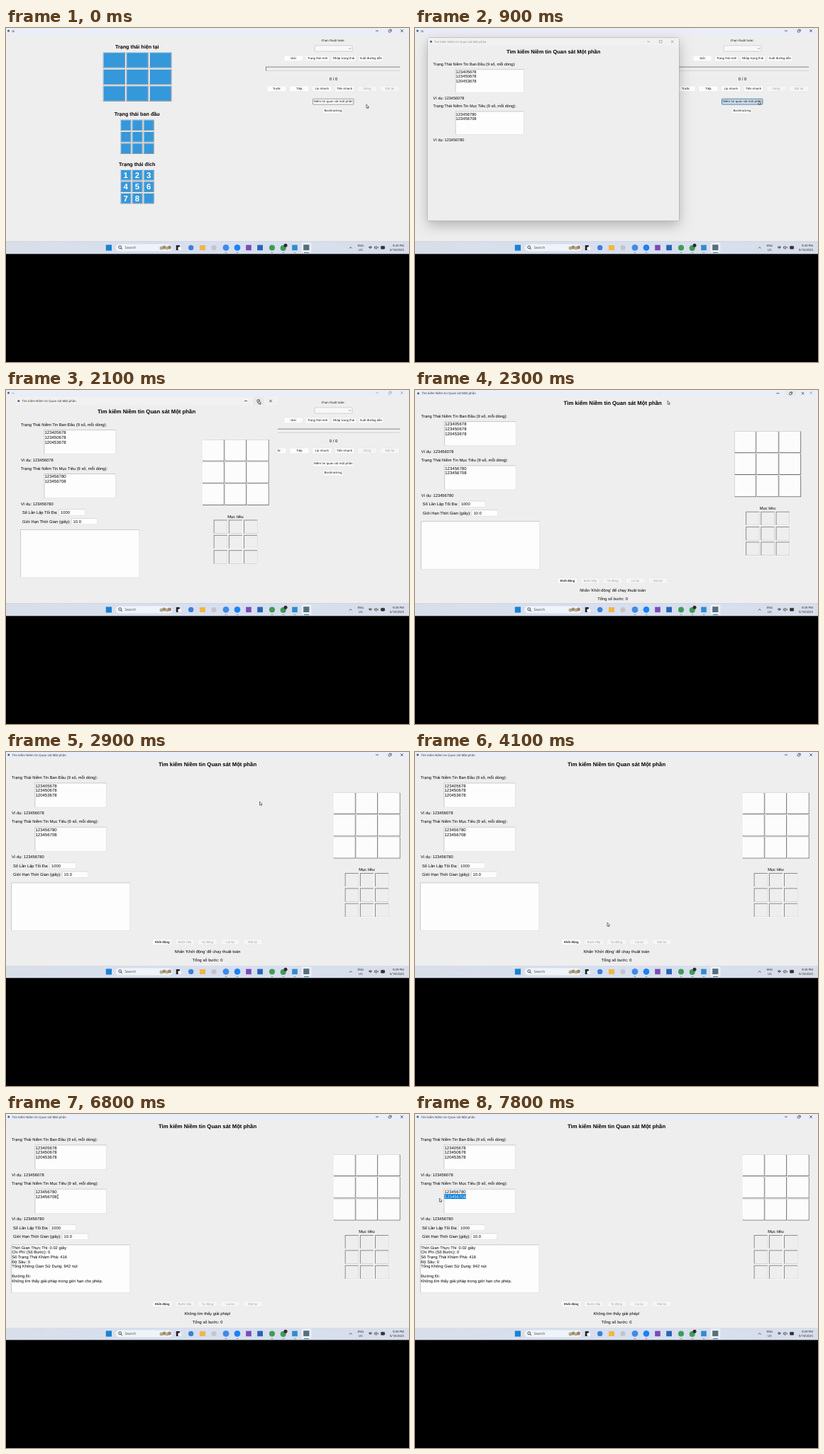
An HTML page with a canvas for the animation above (8 s loop, 568 by 472 pixels).

```html
<!DOCTYPE html>
<html lang="vi">
<head>
<meta charset="utf-8">
<title>Tìm kiếm Niềm tin</title>
<style>
html, body { margin: 0; width: 100%; height: 100%; overflow: hidden; background: #000; }
canvas { display: block; width: 568px; height: 472px; }
</style>
</head>
<body>
<canvas id="stage" width="568" height="472"></canvas>
<script>
const ctx = document.getElementById('stage').getContext('2d');
const LOOP = 8000, OPEN = 780, READY = 1000, MAXIMIZE = 2150, RESULT = 5250;
const UI = '"Open Sans", "Noto Sans", sans-serif';
const ARIAL = '"Liberation Sans", Arial, sans-serif';
const GREY = '#eeeeee', BLUE = '#3498db';
const TITLE = 'Tìm kiếm Niềm tin Quan sát Một phần';

// time, x, y of the pointer tip
const PATH = [
  [0, 508, 108], [500, 484, 103], [1100, 484, 103], [1900, 356, 14.5], [2300, 356, 15],
  [2850, 357.5, 70], [3100, 357.5, 70], [3800, 333, 197], [4100, 271, 241], [4650, 221.5, 270],
  [6100, 221.5, 270], [6450, 100, 104], [6600, 73, 114], [6800, 73, 114],
  [7600, 37, 116], [7800, 34.5, 119], [8000, 34.5, 119]
];

const clamp = v => Math.max(0, Math.min(1, v));
const lerp = (a, b, k) => a + (b - a) * k;

let pointer = { x: 0, y: 0 };

function pointerAt(t) {
  const i = Math.max(1, PATH.findIndex(p => p[0] > t));
  const [t0, x0, y0] = PATH[i - 1], [t1, x1, y1] = PATH[i];
  const k = (t - t0) / (t1 - t0);
  return { x: lerp(x0, x1, k), y: lerp(y0, y1, k) };
}

function rect(x, y, w, h, fill) {
  ctx.fillStyle = fill;
  ctx.fillRect(x, y, w, h);
}

function round(x, y, w, h, r, fill, stroke, width = 0.6) {
  ctx.beginPath();
  ctx.roundRect(x, y, w, h, r);
  if (fill) { ctx.fillStyle = fill; ctx.fill(); }
  if (stroke) { ctx.strokeStyle = stroke; ctx.lineWidth = width; ctx.stroke(); }
}

function dot(x, y, r, fill) {
  ctx.beginPath();
  ctx.arc(x, y, r, 0, 7);
  ctx.fillStyle = fill;
  ctx.fill();
}

function line(points, color = '#333', width = 0.7) {
  ctx.beginPath();
  points.forEach(([x, y]) => ctx.lineTo(x, y));
  ctx.strokeStyle = color;
  ctx.lineWidth = width;
  ctx.stroke();
}

// Set large and scaled down so that glyph advances stay fractional.
function text(s, x, y, size, { align = 'left', color = '#000', font = ARIAL, weight = 400 } = {}) {
  ctx.save();
  ctx.translate(x, y + size * 0.35);
  ctx.scale(0.1, 0.1);
  ctx.textRendering = 'geometricPrecision';
  ctx.font = `${weight} ${size * 10}px ${font}`;
  ctx.textAlign = align;
  ctx.fillStyle = color;
  ctx.fillText(s, 0, 0);
  ctx.restore();
}

const label = (s, x, y) => text(s, x, y, 5.78);
const centered = (s, x, y, size, extra) => text(s, x, y, size, { align: 'center', ...extra });

function bevel(x, y, w, h, fill, light, dark, edge = 1) {
  rect(x, y, w, h, dark);
  rect(x, y, w - edge, h - edge, light);
  rect(x + edge, y + edge, w - 2 * edge, h - 2 * edge, fill);
}

function grid(x, y, dx, dy, draw) {
  for (let i = 0; i < 9; i++) draw(x + i % 3 * dx, y + Math.floor(i / 3) * dy, i);
}

function button(s, cx, cy, w, { off = false, focus = false, weight = 400, ox = 0, oy = 0, active = true } = {}) {
  const x = cx - w / 2, y = cy - 3.8, px = pointer.x - ox, py = pointer.y - oy;
  const hover = active && !off && px > x && px < x + w && py > y && py < y + 7.8;
  round(x, y, w, 7.8, 0.6, hover ? '#d3e0ec' : off ? '#f5f5f5' : '#fcfcfc',
    hover ? '#3a76ab' : focus ? '#666' : '#e6e6e6', hover ? 0.9 : 0.6);
  centered(s, cx, cy, 4.2, { font: UI, color: off ? '#999' : '#000', weight });
}

function titleBar(s, w, y, color, textX, fill, height) {
  rect(0, 0, w, height, fill);
  dot(textX - 4.8, y, 1.5, '#3b5f8c');
  text(s, textX, y, 4.3, { font: UI, color });
}

function windowIcons(w, y, color, restored) {
  line([[w - 47, y], [w - 43, y]], color);
  if (restored) round(w - 29, y - 1.8, 3.6, 3.6, 0.3, null, color);
  else {
    round(w - 28.8, y - 1, 3, 3, 0.5, null, color);
    line([[w - 27.8, y - 1.9], [w - 24.8, y - 1.9], [w - 24.8, y + 1]], color, 0.6);
  }
  line([[w - 11.8, y - 1.8], [w - 8.2, y + 1.8]], color);
  line([[w - 11.8, y + 1.8], [w - 8.2, y - 1.8]], color);
}

function mainWindow(t) {
  const color = t < READY ? '#222' : '#999';
  rect(0, 0, 568, 302, GREY);
  titleBar('tk', 568, 4, color, 8.3, '#e9eef8', 8.5);
  windowIcons(568, 4, color, false);

  const heading = (s, y) => centered(s, 184.7, y, 7.2, { weight: 700 });
  const tile = (w, h) => (x, y) => bevel(x, y, w, h, BLUE, '#d4dde3', '#858b90', 0.9);
  heading('Trạng thái hiện tại', 26.5);
  grid(136.7, 34.3, 32.7, 23.6, tile(31.3, 22.2));
  heading('Trạng thái ban đầu', 121.7);
  grid(161.3, 129.5, 16.2, 16.5, tile(15, 15.4));
  heading('Trạng thái đích', 192.3);
  grid(161.3, 200, 16.2, 16.5, (x, y, i) => {
    tile(15, 15.4)(x, y);
    if (i < 8) centered(String(i + 1), x + 7.5, y + 7.7, 11.5, { weight: 700, color: '#fff' });
  });

  centered('Chọn thuật toán:', 461, 17.5, 4.2, { font: UI });
  round(435, 24.8, 53, 8.2, 0.6, '#f8f8f8', '#bbb');
  line([[483, 28.3], [484.5, 29.8], [486, 28.3]], '#555', 0.6);
  const active = t < 1150;
  button('Giải', 405, 42.8, 26, { active });
  button('Trạng thái mới', 439, 42.8, 33, { active });
  button('Nhập trạng thái', 476, 42.8, 35, { active });
  button('Xuất đường dẫn', 514.5, 42.8, 35, { active });
  bevel(366, 54.6, 190, 6.8, GREY, '#757575', '#f8f8f8', 0.9);
  centered('0 / 0', 461.5, 71.5, 5.9);
  ['Trước', 'Tiếp', 'Lùi nhanh', 'Tiến nhanh', 'Dừng', 'Đặt lại'].forEach((s, i) =>
    button(s, 381.5 + i * 31.9, 85.8, 27, { off: i > 3, active }));
  button('Niềm tin quan sát một phần', 461.2, 104, 57.4, { focus: t < OPEN, active });
  button('Backtracking', 461, 117, 28, { active });
}

function textBox(x, y, w, h, lines, step = 6.65, size = 6.05) {
  bevel(x, y, w, h, '#fdfdfd', '#bcbcbc', '#e6e6e6', 0.7);
  lines.forEach((s, i) => text(s, x + 0.8, y + 4 + i * step, size));
}

function entry(s, x, y) {
  bevel(x, y - 4.5, 37, 9, '#fdfdfd', '#cecece', '#e6e6e6', 0.6);
  label(s, x + 2.6, y);
}

function selection(t) {
  if (t < 6850) return;
  const charWidth = 3.364, left = 41.5;
  const from = Math.max(0, Math.round((pointer.x - left) / charWidth));
  if (from > 8) return;
  const x = left + from * charWidth;
  rect(x, 113.2, 72 - x, 6.8, '#0078d7');
  text('123456708'.slice(from), x + 0.3, 116.6, 6.05, { color: '#fff' });
}

function dialogContent(t, w, rest, ox, oy) {
  const right = w - 568, mid = w / 2;
  centered(TITLE, mid, 17.3, 7.75, { weight: 700 });
  label('Trạng Thái Niềm Tin Ban Đầu (9 số, mỗi dòng):', 8, 36.2);
  textBox(40.6, 43.6, 101.6, 35, ['123405678', '123450678', '120453678']);
  label('Ví dụ: 123456078', 8, 86.3);
  label('Trạng Thái Niềm Tin Mục Tiêu (9 số, mỗi dòng):', 8, 98.3);
  textBox(40.6, 105.8, 101.6, 35, ['123456780', '123456708']);
  selection(t);
  label('Ví dụ: 123456780', 8, 148.4);
  if (t < READY) return;

  label('Số Lần Lặp Tối Đa:', 10, 160.5);
  entry('1000', 61.5, 160.5);
  label('Giới Hạn Thời Gian (giây):', 10, 173.2);
  entry('10.0', 79, 173.2);
  const done = t >= RESULT;
  textBox(7.4, 184.6, 168, 68.4, done ? [
    'Thời Gian Thực Thi: 0.02 giây', 'Chi Phí (Số Bước): 0', 'Số Trạng Thái Khám Phá: 416',
    'Độ Sâu: 0', 'Tổng Không Gian Sử Dụng: 942 nút', '', 'Đường Đi:',
    'Không tìm thấy giải pháp trong giới hạn cho phép.'] : [], 6.7, 5.78);

  grid(462 + right, 57.8, 31.5, 31.2, (x, y) => bevel(x, y, 30.6, 30.2, '#fcfcfc', '#fff', '#6c6c6c', 1));
  centered('Mục tiêu:', 509 + right, 166.3, 5.78);
  grid(477.7 + right, 171, 21.2, 21.4, (x, y) => bevel(x, y, 20, 20, GREY, '#808080', '#f8f8f8', 0.9));

  // The restored window is too short for the footer and cuts it off.
  const footer = 268.4 + 4.5 * rest;
  ['Khởi động', 'Bước tiếp', 'Tự động', 'Lùi lại', 'Đặt lại'].forEach((s, i) =>
    button(s, mid - 63.8 + i * 31.9, footer, 27, { off: i > 0, weight: i ? 400 : 600, ox, oy }));
  centered(done ? 'Không tìm thấy giải pháp!' : "Nhấn 'Khởi động' để chạy thuật toán", mid, footer + 13.1, 5.75);
  centered('Tổng số bước: 0', mid, footer + 25.6, 5.78);
}

function dialog(t) {
  const grow = 1 - (1 - clamp((t - MAXIMIZE) / 250)) ** 3;
  const rest = 1 - grow;
  const opening = 1 - clamp((t - 800) / 200);
  const scale = 1 - 0.086 * opening;
  const x = 13 * rest + 10 * opening, y = 10 * rest + 8 * opening;
  const w = 370 + 198 * grow, h = 270 + 32 * grow;
  const lift = 1 - clamp((t - 1900) / 150);
  ctx.save();
  ctx.globalAlpha = clamp((t - OPEN) / 100);
  ctx.translate(x, y);
  ctx.scale(scale, scale);
  if (lift > 0) {
    ctx.shadowColor = `rgba(0,0,0,${0.26 * lift})`;
    ctx.shadowBlur = 18;
    ctx.shadowOffsetY = 6;
    round(0, 0, w, h, 2, GREY);
    ctx.shadowColor = 'transparent';
    round(0, 0, w, h, 2, null, `rgba(120,120,120,${0.5 * lift})`, 1);
  }
  ctx.beginPath();
  ctx.roundRect(0, 0, w, h, 2 * rest);
  ctx.clip();
  rect(0, 0, w, h, GREY);
  const barY = 4 + 1.5 * rest, color = t < 1100 ? '#888' : '#222';
  titleBar(TITLE, w, barY, color, 8.6 + rest, rest > 0.3 ? '#f1f1f2' : '#e9eef8', 8.5 + 2.5 * rest);
  if (t > 1850 && t < 2350) rect(w - 35, 0, 16, 8.5 + 2.5 * rest, '#e8e9ea');
  windowIcons(w, barY, color, rest > 0.3);
  ctx.translate(0, 2.5 * rest);
  dialogContent(t, w, rest, x, y + 2.5 * rest);
  ctx.restore();
}

function taskbar() {
  const sky = ctx.createLinearGradient(0, 0, 568, 0);
  sky.addColorStop(0, '#d9dfe9');
  sky.addColorStop(0.5, '#d7dff0');
  sky.addColorStop(1, '#d8deea');
  rect(0, 301.5, 568, 18, sky);
  rect(0, 301.5, 568, 0.6, '#c3ccd8');

  rect(140.8, 306.4, 8.2, 8.2, '#1a82d4');
  round(154, 305, 81, 11, 5.5, '#eff3fa', '#ccd4df', 0.5);
  ctx.beginPath();
  ctx.arc(160.7, 309.7, 1.9, 0, 7);
  ctx.strokeStyle = '#222';
  ctx.lineWidth = 0.8;
  ctx.stroke();
  line([[162, 311.2], [163.8, 313]], '#222', 0.9);
  text('Search', 167.5, 310.6, 5, { font: UI, color: '#444' });
  [[219, '#b9aa86'], [223, '#8c9080'], [227, '#c9ad76'], [230.5, '#9a8672']].forEach(([x, c], i) =>
    dot(x, 310.9 - i % 2, 2.5, c));

  rect(239.8, 307, 5, 7, '#222');
  rect(242.5, 309.5, 4.3, 4.3, '#fff');
  dot(260.7, 310.4, 3.7, '#3b82d8');
  rect(273, 307, 8, 7, '#f0b840');
  dot(293, 310.5, 3.5, '#c5c4c5');
  dot(310, 310.4, 4.4, '#3f8be6');
  dot(326, 310.4, 4.3, '#1a82f5');
  rect(338.2, 306.6, 7.6, 7.6, '#7a4bb5');
  rect(354.2, 306.6, 7.8, 7.6, '#2a64b8');
  dot(375, 310.4, 4, '#3f9c55');
  dot(390.7, 311, 4, '#3f9c55');
  dot(394, 307.3, 2.5, '#35272a');
  rect(403.2, 306.6, 7.6, 7.6, '#2f8cd0');
  round(416.5, 303.3, 14, 14.5, 2, '#eaeff7');
  rect(419.2, 306.2, 8.2, 7.8, '#55707c');
  [310, 326, 375, 391, 407].forEach(x => rect(x - 1.3, 317, 2.6, 0.9, '#858d98'));
  rect(420, 317, 7, 1, '#3c7d98');

  line([[483.8, 311.5], [485.7, 309.6], [487.6, 311.5]], '#222');
  const tray = { font: UI, color: '#222' };
  centered('ENG', 499.8, 307.6, 4.3, tray);
  centered('US', 499.8, 313.6, 4.3, tray);
  [1, 2.2, 3.4].forEach(r => {
    ctx.beginPath();
    ctx.arc(513.5, 312.3, r, -2.4, -0.74);
    ctx.strokeStyle = '#222';
    ctx.lineWidth = 0.8;
    ctx.stroke();
  });
  line([[519.5, 309.3], [520.7, 309.3], [522, 308], [522, 312.6], [520.7, 311.3], [519.5, 311.3], [519.5, 309]], '#222', 0.6);
  line([[523, 309.3], [525, 311.3]], '#222', 0.6);
  line([[525, 309.3], [523, 311.3]], '#222', 0.6);
  round(528.5, 308.3, 5.2, 4, 0.8, '#333', '#222', 0.5);
  text('9:39 PM', 561, 307.6, 4.3, { ...tray, align: 'right' });
  text('5/18/2025', 561, 313.6, 4.3, { ...tray, align: 'right' });
}

function drawPointer(t) {
  const { x, y } = pointer;
  const overText = t > MAXIMIZE + 250 && x > 41 && x < 142 && ((y > 44 && y < 78) || (y > 106 && y < 140));
  if (overText) {
    line([[x, y], [x, y + 5.6]], '#222', 0.7);
    line([[x - 1, y], [x + 1, y]], '#222', 0.5);
    line([[x - 1, y + 5.6], [x + 1, y + 5.6]], '#222', 0.5);
    return;
  }
  ctx.save();
  ctx.translate(x, y);
  ctx.beginPath();
  [[0, 0], [0, 5.2], [1.2, 4.1], [2, 5.8], [2.8, 5.4], [2, 3.8], [3.6, 3.7]].forEach(p => ctx.lineTo(...p));
  ctx.closePath();
  ctx.fillStyle = '#fff';
  ctx.fill();
  ctx.strokeStyle = '#222';
  ctx.lineWidth = 0.6;
  ctx.stroke();
  ctx.restore();
}

function draw(t) {
  pointer = pointerAt(t);
  mainWindow(t);
  taskbar();
  if (t > OPEN) dialog(t);
  drawPointer(t);
  rect(0, 319.5, 568, 152.5, '#000');
}

const start = performance.now();
function tick() {
  draw((performance.now() - start) % LOOP);
  requestAnimationFrame(tick);
}
tick();
</script>
</body>
</html>
```
